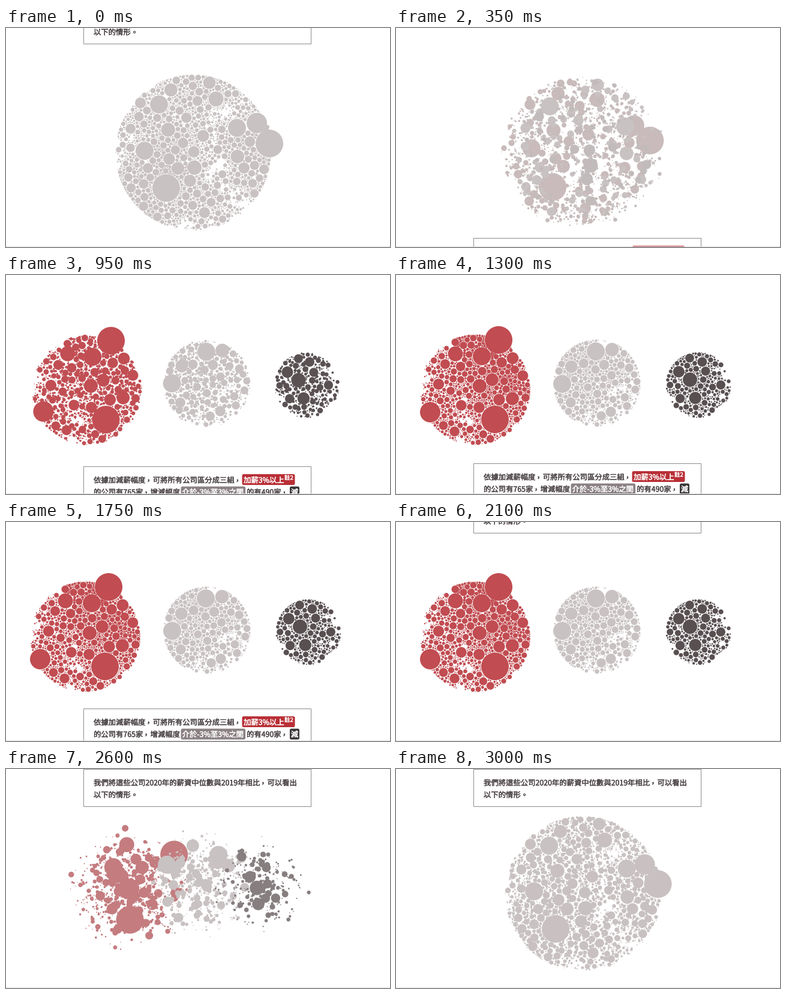
A matplotlib script that plays this animation: 640x364 px, repeating every 3050 ms.

```python
from itertools import groupby

import matplotlib.pyplot as plt
import numpy as np
from matplotlib.animation import FuncAnimation
from matplotlib.collections import EllipseCollection
from matplotlib.colors import to_rgb
from matplotlib.patches import FancyBboxPatch, Rectangle
from matplotlib.patheffects import withStroke
from matplotlib.transforms import Affine2D

W, H, DPI = 640, 364, 100
FRAMES, STEP = 61, 50
SPLIT_AT, MERGE_AT, DURATION = 105, 2133, 1000
FONT, EM, INK = "Noto Sans CJK JP", 12.35, "#4c4446"
BASE = np.array(to_rgb("#c9c2c2"))
PAD = 0.45
rng = np.random.default_rng(8)

# Group discs: colour, bubble count, centre, radius
GROUPS = [("#c14c51", 765, (132, 191), 92),
          ("#c9c2c2", 490, (335, 180), 73),
          ("#584f51", 270, (504, 183), 55)]
MERGED = (312, 207), 130

# Landmark bubbles: group, radius, merged x, y, split x, y
LANDMARKS = np.array([(0, 23, 439, 192, 171, 108), (0, 23, 267, 266, 165, 240),
                      (0, 17, 418, 158, 57, 228), (0, 15, 231, 204, 143, 135),
                      (1, 15, 385, 166, 333, 127), (1, 15, 255, 127, 277, 181),
                      (0, 12.5, 350, 118, 99, 131), (2, 12, 314, 232, 490, 174)])


def pack(fixed, r, centre, radius, rounds=45):
    """Fill a disc with circles pushed apart around the fixed first ones."""
    n, k = len(r), len(fixed)
    angle = rng.uniform(0, 2 * np.pi, n)
    dist = (radius - r) * np.sqrt(rng.random(n))
    pos = centre + np.c_[dist * np.cos(angle), dist * np.sin(angle)]
    pos[:k] = fixed
    mass = r ** 2
    mass[:k] = 1e9
    reach = r[:, None] + r + 2
    for _ in range(rounds):
        gap2 = (pos[:, :1] - pos[:, 0]) ** 2 + (pos[:, 1:] - pos[:, 1]) ** 2
        i, j = np.nonzero(np.triu(gap2 < reach ** 2, 1))
        share = mass[j] / (mass[i] + mass[j])
        for _ in range(8):
            d = pos[i] - pos[j]
            length = np.hypot(*d.T) + 1e-6
            push = d * (0.5 * np.maximum(r[i] + r[j] - length, 0) / length)[:, None]
            step = np.column_stack([np.bincount(i, p * share, n)
                                    - np.bincount(j, p * (1 - share), n)
                                    for p in push.T])
            pos[k:] += np.clip(step[k:], -2, 2)
            out = pos - centre
            far = np.hypot(*out.T)
            excess = np.maximum(far + r - radius, 0) / (far + 1e-6)
            pos[k:] -= 0.3 * (out * excess[:, None])[k:]
    return pos


def build():
    """Radii follow a rank law; the ranks are dealt to the groups at random."""
    total = sum(g[1] for g in GROUPS)
    lead = len(LANDMARKS)
    rank = np.arange(lead + 1, total + 1)
    r = np.r_[LANDMARKS[:, 1], 23 * rank ** -0.3 / (1 + rank / 560)]
    group = np.repeat(np.arange(3), [g[1] for g in GROUPS])
    spare = np.concatenate([np.flatnonzero(group == g)[(LANDMARKS[:, 0] == g).sum():]
                            for g in range(3)])
    group = np.r_[LANDMARKS[:, 0], rng.permutation(group[spare])].astype(int)

    start = pack(LANDMARKS[:, 2:4], r + PAD, *MERGED)
    end = np.empty_like(start)
    for g, (_, _, centre, radius) in enumerate(GROUPS):
        end[group == g] = pack(LANDMARKS[LANDMARKS[:, 0] == g, 4:],
                               r[group == g] + PAD, centre, radius)
    tint = np.array([to_rgb(g[0]) for g in GROUPS])[group]
    order = np.argsort(group, kind="stable")
    return r[order], start[order], end[order], tint[order]


def ease(u):
    u = np.clip(u, 0, 1)
    return 4 * u ** 3 if u < 0.5 else 1 - 4 * (1 - u) ** 3


def scroll_at(t):
    """Page offset: a coasting scroll down, then one back up."""
    if t <= 1750:
        return -70 + 97 * np.exp(-t / 400)
    return 63 - 132 * (1 - min((t - 1750) / 830, 1)) ** 2


radius, merged, split, tint = build()

fig = plt.figure(figsize=(W / DPI, H / DPI), dpi=DPI, facecolor="white")
ax = fig.add_axes([0, 0, 1, 1])
ax.set(xlim=(0, W), ylim=(H, 0))
ax.axis("off")

bubbles = EllipseCollection(2 * radius, 2 * radius, np.zeros(len(radius)),
                            units="xy", offsets=merged, offset_transform=ax.transData,
                            linewidths=0, facecolors=[BASE])
ax.add_collection(bubbles, autolim=False)
ax.add_patch(Rectangle((0, 362.5), W, 1.5, fc="#e4e4e4", lw=0, zorder=5))

scroll = Affine2D()
page = scroll + ax.transData


def advance(text, size):
    narrow = {"%": 0.921, "-": 0.347}
    return size * sum(narrow.get(c, 0.555 if c.isdigit() else 1) for c in text)


def write(x, y, text, size=EM, color=INK):
    """Text centred on line y; punctuation sits mid-cell."""
    shift = {"，": (0.18, -0.2), "。": (0.32, -0.26)}
    for mark, run in groupby(text, lambda c: c if c in shift else ""):
        run = "".join(run)
        dx, dy = shift.get(mark, (0, 0))
        ax.text(x + dx * size, y + (0.38 + dy) * size, run, fontsize=size * 72 / DPI,
                family=FONT, color=color, transform=page, zorder=4,
                path_effects=[withStroke(linewidth=0.3, foreground=color)])
        x += advance(run, size)
    return x


def panel(y, height):
    ax.add_patch(Rectangle((129.5, y), 379, height, fc="white", ec="#8f8b8c",
                           lw=72 / DPI, transform=page, zorder=3, snap=False))


def chip(x, y, width, color):
    ax.add_patch(FancyBboxPatch((x, y - 9), width, 18, fc=color, lw=0, zorder=3.5,
                                boxstyle="round,pad=0,rounding_size=2.5",
                                transform=page))


# Page coordinates: the first panel ends at 0, the second begins at 380
LEFT, TOP = 146, 380
panel(-62, 62)
write(LEFT, -40, "我們將這些公司2020年的薪資中位數與2019年相比，可以看出")
write(LEFT, -20, "以下的情形。")

panel(TOP, 120)
line1, line2, line3 = (TOP + 22 + 20 * k for k in range(3))
RED_CHIP, GREY_CHIP, DARK_CHIP = "#b92f36", "#8b8183", "#3a3536"
write(LEFT, line1, "依據加減薪幅度，可將所有公司區分成三組，")
chip(393.5, line1 - 0.5, 88, RED_CHIP)
x = write(396, line1, "加薪3%以上", color="white")
write(x + 0.5, line1 - 4, "註2", 9.4, "white")
x = write(LEFT, line2, "的公司有765家，增減幅度")
chip(x + 1.5, line2, 107.5, GREY_CHIP)
write(x + 3.5, line2, "介於-3%至3%之間", color="white")
x = write(401, line2, "的有490家，")
chip(x + 2, line2, 16, DARK_CHIP)
write(x + 3.8, line2, "減", color="white")
chip(LEFT, line3, 57.5, DARK_CHIP)
write(LEFT + 1, line3, "薪3%以上", color="white")


def draw(i):
    t = i * STEP
    p = ease((t - SPLIT_AT) / DURATION) - ease((t - MERGE_AT) / DURATION)
    bubbles.set_offsets(merged + (split - merged) * p)
    bubbles.set_facecolor(np.clip(BASE + (tint - BASE) * p, 0, 1))
    scroll.clear().translate(0, round(scroll_at(t)) - 0.5)
    return [bubbles]


anim = FuncAnimation(fig, draw, frames=FRAMES, interval=STEP, repeat=True,
                     repeat_delay=0, blit=False)
plt.show()
```
